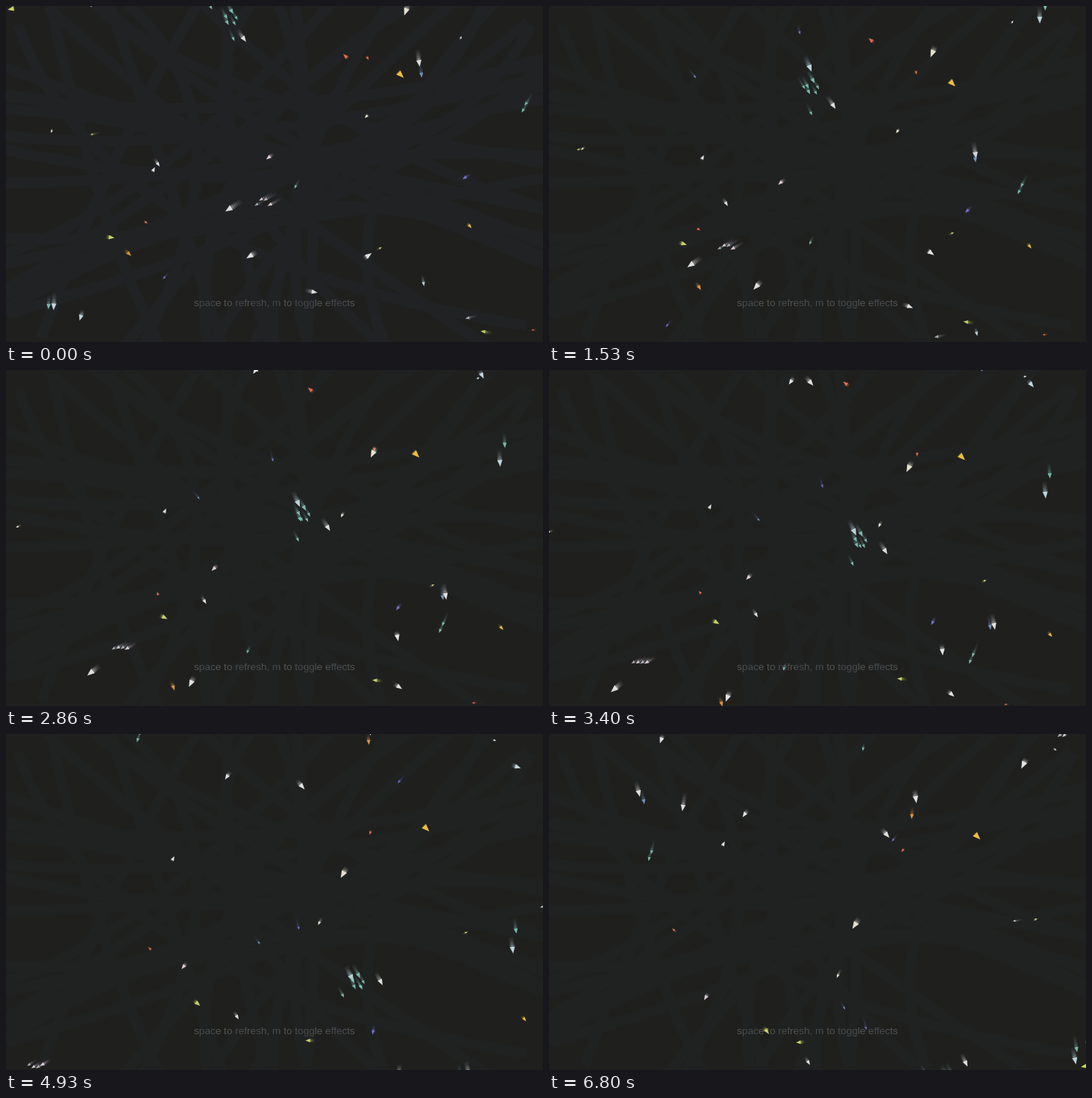
An HTML page with a canvas for the animation above (6860 ms loop, 720 px wide and 450 px high).

```html
<!DOCTYPE html>
<html lang="en">
<meta charset="utf-8">
<title>Flock</title>
<style>
  html, body { margin: 0; width: 100%; height: 100%; overflow: hidden; background: #1f201e; }
  p { position: absolute; top: 390px; left: 0; width: 720px; margin: 0; text-align: center;
      font: 13.6px/16px "Liberation Sans", Arial, sans-serif; color: #535353; }
  canvas { position: absolute; top: 0; left: 0; }
</style>
<p>space to refresh, m to toggle effects</p>
<canvas width="720" height="450"></canvas>
<script>
const ctx = document.querySelector('canvas').getContext('2d');
const W = 720, H = 450, MARGIN = 28;
const LOOP = 6860, FPS = 15, SPAN = 6.8;
const RATE = 2 * FPS, LEAD = 8, TAIL = 5;
const white = '#f2f2f4', ice = '#cfe6ee', cream = '#f4f1dc', pink = '#ecd9e6', teal = '#85c9bc',
  blue = '#7f9fd0', violet = '#7c7cdc', red = '#ee7450', orange = '#f0a040', gold = '#fbc846',
  lime = '#d8e070', grey = '#b5b9c0';

const birds = [];

// A bird leaves (x, y), travels (dx, dy) in SPAN seconds and bows by (bx, by) halfway.
// Beyond one edge it comes back at the opposite one, mirrored along that edge.
function fly(r, color, x, y, dx, dy, bx = 0, by = 0) {
  const path = [];
  let ox = 0, oy = 0;
  for (let k = -LEAD; k <= LOOP / 1000 * RATE; k++) {
    const u = k / RATE / SPAN, bow = 4 * u * (1 - u);
    const px = x + dx * u + bx * bow + ox, py = y + dy * u + by * bow + oy;
    const [lx, ly] = path.at(-1) ?? [px, py];
    const outX = leaving(px, lx, W), outY = leaving(py, ly, H);
    if (outY) {
      ox += W - 2 * px;
      oy -= outY * (H + 2 * MARGIN);
    } else if (outX) {
      ox -= outX * (W + 2 * MARGIN);
      oy += H - 2 * py;
    }
    path.push([px, py]);
  }
  birds.push({ r, color, path });
}

// 1 past the far edge, -1 past the near edge, only while moving outward
function leaving(now, before, size) {
  if (now > size + MARGIN && now > before) return 1;
  return now < -MARGIN && now < before ? -1 : 0;
}

// slow wanderers
fly(6, gold, 529, 92, 45, 45, 2, 2);
fly(4, red, 455, 67, -135, -104, 10, 3);
fly(2.7, red, 485, 70, -11, 86, 14);
fly(2.6, red, 188, 290, -21, -28, 25, 22);
fly(2, red, 706, 434, -188, 28);
fly(3.4, gold, 622, 295, 101, 120);
fly(4.5, lime, 141, 310, 151, 88, 8, -16);
fly(3.8, lime, 640, 436, -305, -23, -17, -11);
fly(5, lime, 7, 4, -65, 12);
fly(2.2, lime, 502, 324, 151, -76, 7, -4);
fly(2.2, lime, 115, 172, -150, 90, -60);
fly(2.2, cream, 61, 168, -213, 86, 45, 6);
fly(2, white, 610, 42, 69, -21, -6, -23);
fly(3.5, white, 198, 219, 36, -72);

// steady fliers
fly(6, cream, 536, 7, -126, 249, 9);
fly(3, cream, 483, 148, -96, 176, 8, -28);
fly(3.7, white, 204, 212, 144, 228, 2, 2);
fly(4, pink, 352, 203, -142, 150, -14);
fly(2.7, teal, 388, 242, -106, 284, -20, 16);
fly(2.3, blue, 114, 0, 282, 367, 26, 17);
fly(3.5, violet, 615, 230, -130, 253, -36, -18);
fly(2.5, violet, 212, 364, -239, 284);
fly(4, orange, 165, 332, 79, 284, 27, -27);
fly(5.7, white, 327, 335, -100, 258, -38, -25);
fly(5.2, white, 486, 334, 23, 270, 30, -92);
fly(4.7, white, 413, 383, 146, 131, 54, -14);
fly(3.3, grey, 619, 418, -440, 80, 0, 10);
fly(3.3, ice, 560, 372, 60, 110, 0, 60);
fly(4.8, ice, 100, 417, 125, 143, -53, 37);
fly(4.3, white, 386, -76, -124, 184);
fly(5.2, white, 249, -101, 204, 236);

// pairs
fly(4.3, teal, 57, 402, 40, 526, -16, -18);
fly(5.5, ice, 64, 402, 46, 541, -17);
fly(5.5, white, 554, 76, 98, 509, -6, 12);
fly(4, blue, 557, 92, 77, 504, -4);
for (let i = 0; i < 2; i++) fly(3.3, teal, 697 - 4 * i, 131 + 9 * i, -215, 533, -21, -16);

// flock heading down-left
fly(6, white, 299, 272, -315, 275, -54, 18);
for (let i = 0; i < 4; i++) {
  const arch = 8 * Math.sin(i * 1.05);
  fly(3 + i / 4, i % 2 ? pink : grey, 336 + 6 * i, 266 - arch, -390, 235 + 2 * arch, -28, 8);
}

// flock heading down-right: leaders, stragglers and a loose ring
fly(5, white, 319, 44, 240, 397, 12);
fly(5.7, ice, 306, -27, 229, 487, -11);
fly(2.6, violet, 312, -57, 113, 451, -2, -13);
fly(3.2, teal, 305, 44, 200, 411, 2, 10);
fly(3, teal, 275, 2, 265, 458, 10, 5);
for (let i = 0; i < 5; i++) {
  const a = i * 2.4;
  fly(3.2 + i % 3 * .6, teal, 302 + 7 * Math.cos(a), 16 + 9 * Math.sin(a), 238, 449, -3, -12);
}

// Old flight paths left in the background: seeded curves through the middle of the stage
let seed = 7;
const random = (a, b) => {
  seed = seed * 16807 % 2147483647;
  return a + (b - a) * seed / 2147483647;
};
const wakes = new Path2D();
for (let i = 0; i < 34; i++) {
  const a = random(0, 2 * Math.PI), b = a + random(2, 4.3);
  wakes.moveTo(360 + 460 * Math.cos(a), 225 + 300 * Math.sin(a));
  wakes.quadraticCurveTo(random(120, 600), random(90, 360), 360 + 460 * Math.cos(b), 225 + 300 * Math.sin(b));
}

function drawBird({ r, color, path }, step) {
  ctx.fillStyle = color;
  for (let k = TAIL; k >= 0; k--) {
    const [x, y] = path[step - k], [px, py] = path[step - k - 1];
    ctx.globalAlpha = k ? .36 * .66 ** k : .88;
    ctx.save();
    ctx.translate(x, y);
    ctx.rotate(Math.atan2(y - py, x - px));
    ctx.beginPath();
    ctx.moveTo(r, 0);
    ctx.lineTo(-r * .65, r * .65);
    ctx.lineTo(-r * .65, -r * .65);
    ctx.fill();
    ctx.restore();
  }
}

function draw(ms) {
  const tick = Math.floor(ms % LOOP / 10) * 10;
  const frame = Math.floor((tick + 6.7) * FPS / 1000);
  ctx.clearRect(0, 0, W, H);
  ctx.globalAlpha = .22 + .1 * Math.max(0, 1 - frame / FPS);
  ctx.strokeStyle = '#282a33';
  ctx.lineWidth = 14;
  ctx.stroke(wakes);
  for (const bird of birds) drawBird(bird, LEAD + frame * RATE / FPS);
}

const start = performance.now();
function loop() {
  draw(performance.now() - start);
  requestAnimationFrame(loop);
}
loop();
</script>
</html>
```
